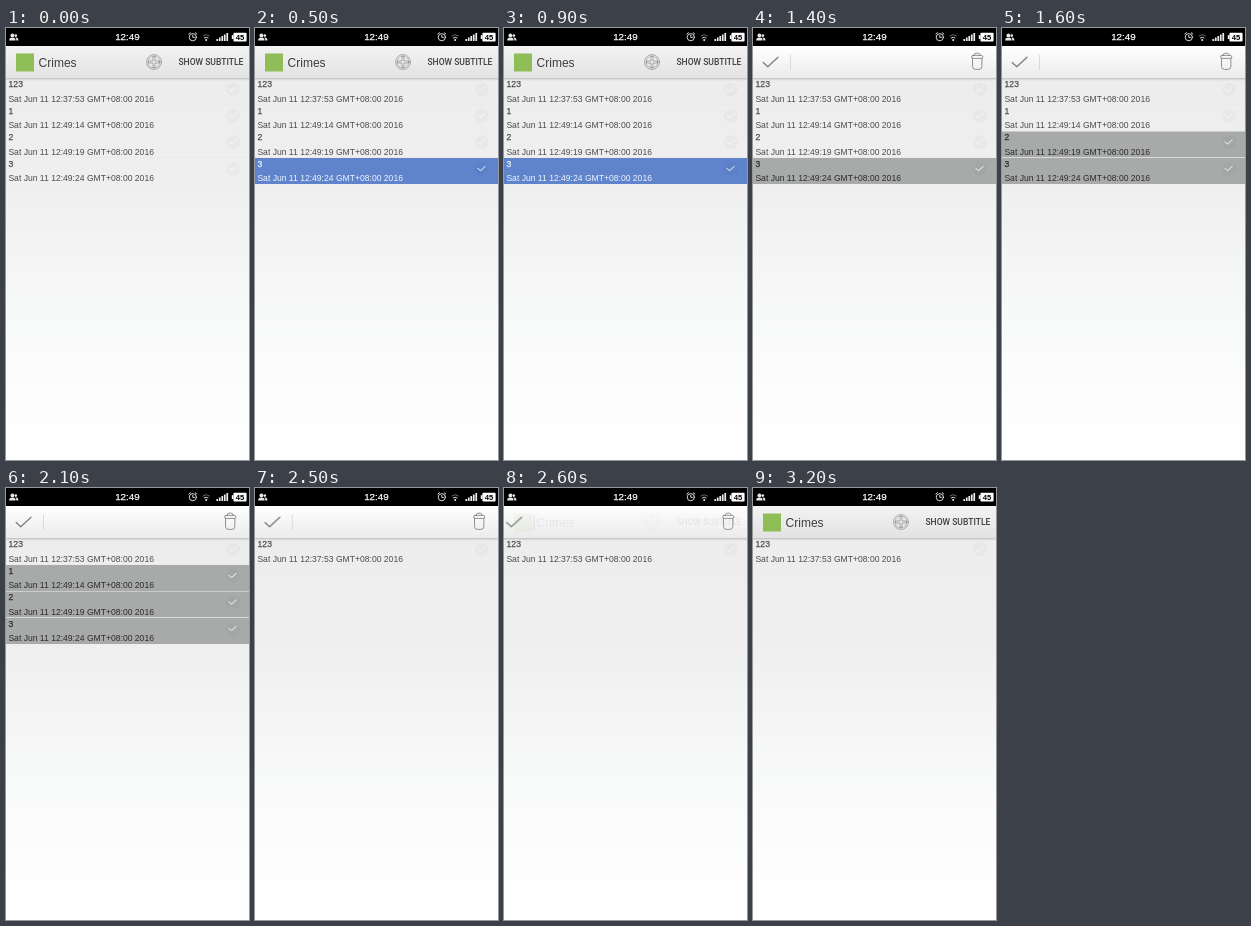
Recreate the animation shown at these times as an HTML page. Size 243x432 px, loop 4.1 s.

```html
<!DOCTYPE html>
<html lang="en">
<head>
<meta charset="utf-8">
<title>Crime list</title>
<style>
  @property --bg { syntax: "<color>"; inherits: true; initial-value: transparent; }
  html, body { margin: 0; width: 100%; height: 100%; overflow: hidden; background: #fff; }
  svg { display: block; width: 100vw; height: 100vh; font-family: "Liberation Sans", Arial, sans-serif; }
  .anim, .row { animation: 4.1s step-end -20ms infinite; }
  .row { color: #4c4c4c; }
  .row text { font-size: 8.58px; fill: currentColor; }
  .medium { stroke: currentColor; stroke-width: .25px; }
  .line { fill: none; stroke-linecap: round; stroke-linejoin: round; }
  .tick { stroke: #f6f6f6; stroke-opacity: .7; stroke-width: 1.1px; }

  /* press shows blue, a chosen row stays grey until it is deleted */
  #row1 { animation-name: row1; }
  #row2 { animation-name: row2; }
  #row3 { animation-name: row3; }
  @keyframes row1 {
    0% { --bg: transparent; color: #4c4c4c; opacity: 1; }
    43.902% { --bg: #5f84cc; color: #f0f4ff; }
    46.341% { --bg: #a8a9a9; color: #2c2c2c; opacity: 1; }
    60.976%, 100% { opacity: 0; }
  }
  @keyframes row2 {
    0% { --bg: transparent; color: #4c4c4c; opacity: 1; }
    36.585% { --bg: #5f84cc; color: #f0f4ff; }
    39.024% { --bg: #a8a9a9; color: #2c2c2c; opacity: 1; }
    60.976%, 100% { opacity: 0; }
  }
  @keyframes row3 {
    0% { --bg: transparent; color: #4c4c4c; opacity: 1; }
    12.195% { --bg: #5f84cc; color: #f0f4ff; }
    24.39% { --bg: #a8a9a9; color: #2c2c2c; opacity: 1; }
    60.976%, 100% { opacity: 0; }
  }

  #home { animation-name: home; }
  #context { animation-name: context; }
  #done { animation-name: done; }
  @keyframes home {
    0% { opacity: 1; }
    24.39% { opacity: 1; animation-timing-function: ease-out; }
    29.268% { opacity: 0; }
    60.976% { opacity: 0; animation-timing-function: cubic-bezier(.6, 0, .9, .4); }
    68.293%, 100% { opacity: 1; }
  }
  @keyframes context {
    0% { opacity: 0; }
    24.39% { opacity: 0; animation-timing-function: ease-out; }
    29.268% { opacity: 1; }
    60.976% { opacity: 1; animation-timing-function: cubic-bezier(.6, 0, .9, .4); }
    68.293%, 100% { opacity: 0; }
  }
  @keyframes done {
    0% { transform: translateX(-40px); }
    24.39% { transform: translateX(-40px); animation-timing-function: cubic-bezier(.333, .667, .667, 1); }
    31.707% { transform: none; }
    60.976% { transform: none; animation-timing-function: cubic-bezier(.333, 0, .667, .333); }
    68.293%, 100% { transform: translateX(-46px); }
  }
</style>
</head>
<body>
<svg viewBox="0 0 243 432" preserveAspectRatio="none">
  <defs>
    <linearGradient id="page" x2="0" y2="1">
      <stop offset="0" stop-color="#ededed"/>
      <stop offset=".28" stop-color="#efefef"/>
      <stop offset=".62" stop-color="#f8f9f9"/>
      <stop offset=".9" stop-color="#fefefe"/>
    </linearGradient>
    <linearGradient id="bar" x2="0" y2="1">
      <stop offset="0" stop-color="#f3f3f3"/>
      <stop offset="1" stop-color="#e2e2e2"/>
    </linearGradient>
    <linearGradient id="lightBar" x2="0" y2="1">
      <stop offset="0" stop-color="#fff"/>
      <stop offset="1" stop-color="#ebebeb"/>
    </linearGradient>
    <linearGradient id="shade" x2="0" y2="1">
      <stop offset="0" stop-color="#000" stop-opacity=".1"/>
      <stop offset="1" stop-color="#000" stop-opacity="0"/>
    </linearGradient>
  </defs>

  <rect y="50" width="243" height="382" fill="url(#page)"/>
  <g id="list"></g>

  <!-- action bar -->
  <rect y="18" width="243" height="32.5" fill="url(#bar)"/>
  <g id="context" class="anim">
    <rect y="18" width="243" height="32.5" fill="url(#lightBar)"/>
    <g id="done" class="anim">
      <path class="line" d="M10.2 34.6 14.8 38.8 25 29.2" stroke="#808080" stroke-width="1.4"/>
      <path d="M37.5 27V42" stroke="#d2d2d2" stroke-width=".8"/>
    </g>
    <g class="line" stroke="#777" stroke-width=".8">
      <path d="M221.2 27.4Q221.2 25.2 223 25.2H225.4Q227.2 25.2 227.2 27.4"/>
      <rect x="218.6" y="27.4" width="11.2" height="3" rx="1.4"/>
      <path d="M219.5 30.4V38.4Q219.5 41.4 222.5 41.4H225.9Q228.9 41.4 228.9 38.4V30.4"/>
    </g>
  </g>
  <g id="home" class="anim" color="#3e3e3e">
    <rect x="10" y="25.5" width="18" height="18" fill="#8fbd58"/>
    <text x="32.6" y="38.8" font-size="12" fill="#3e3e3e">Crimes</text>
    <g class="line" stroke="#7a7a7a" stroke-width=".6">
      <circle cx="148" cy="34" r="7.4"/>
      <circle cx="148" cy="34" r="5.9" stroke-width=".4"/>
      <path d="M147 28.6V33H142.6V35H147V39.4H149V35H153.4V33H149V28.6Z"/>
    </g>
    <text x="172.4" y="37" font-size="8.55" font-weight="500" font-family="Roboto, sans-serif" fill="#3e3e3e">SHOW SUBTITLE</text>
  </g>
  <rect y="50" width="243" height="1" fill="#c8c8c8"/>
  <rect y="51" width="243" height="2" fill="url(#shade)"/>

  <!-- status bar -->
  <rect width="243" height="18" fill="#000"/>
  <g fill="#e8e8e8">
    <circle cx="6.4" cy="7.4" r="1.9"/>
    <path d="M3.2 12.4Q3.2 9.6 6.4 9.6T9.6 12.4Z"/>
    <circle cx="9.8" cy="7.6" r="1.3"/>
    <path d="M10.4 12.4Q10.4 10.6 9.3 9.6Q12.4 9.2 12.4 12.4Z"/>
  </g>
  <text class="medium" color="#fff" x="121.4" y="12.4" font-size="9.8" fill="#fff" text-anchor="middle">12:49</text>
  <g class="line" stroke="#eee" stroke-width=".9">
    <circle cx="186.8" cy="9.2" r="3.6"/>
    <path d="M186.8 7.2V9.4H188.4M182.8 6 184.4 4.7M190.8 6 189.2 4.7"/>
    <path d="M197 7.9Q200.2 5.2 203.4 7.9" stroke="#777"/>
    <path d="M198.3 9.9Q200.2 8.3 202.1 9.9"/>
  </g>
  <circle cx="200.2" cy="12" r="1" fill="#eee"/>
  <g id="signal" fill="#eee"></g>
  <rect x="225.8" y="7.2" width="1.6" height="3.8" fill="#fff"/>
  <rect x="227.4" y="4.8" width="13.2" height="8.6" rx="1" fill="#fff"/>
  <text x="234" y="11.8" font-size="7.6" font-weight="bold" text-anchor="middle">45</text>
</svg>
<script>
  const PITCH = 26.5;
  const crimes = [["123", "12:37:53"], ["1", "12:49:14"], ["2", "12:49:19"], ["3", "12:49:24"]];

  const row = ([title, time], i) => `
    <g id="row${i}" class="row" transform="translate(0 ${50 + i * PITCH})">
      <rect y=".5" width="243" height="${PITCH - .5}" fill="var(--bg)"/>
      <rect y="${PITCH}" width="243" height=".5" fill="#e6e6e6"/>
      <text class="medium" x="2.6" y="9.2">${title}</text>
      <text x="2.4" y="23.8">Sat Jun 11 ${time} GMT+08:00 2016</text>
      <circle cx="227" cy="11.4" r="7" fill="#000" fill-opacity=".025"/>
      <path class="line tick" d="M222.8 10.8 225.6 13.2 230.2 8.8"/>
    </g>`;

  const bar = (_, i) =>
    `<rect x="${210.4 + i * 2.5}" y="${11 - i * 1.5}" width="1.7" height="${2 + i * 1.5}"/>`;

  document.getElementById("list").innerHTML = crimes.map(row).join("");
  document.getElementById("signal").innerHTML = Array.from({ length: 5 }, bar).join("");
</script>
</body>
</html>
```
